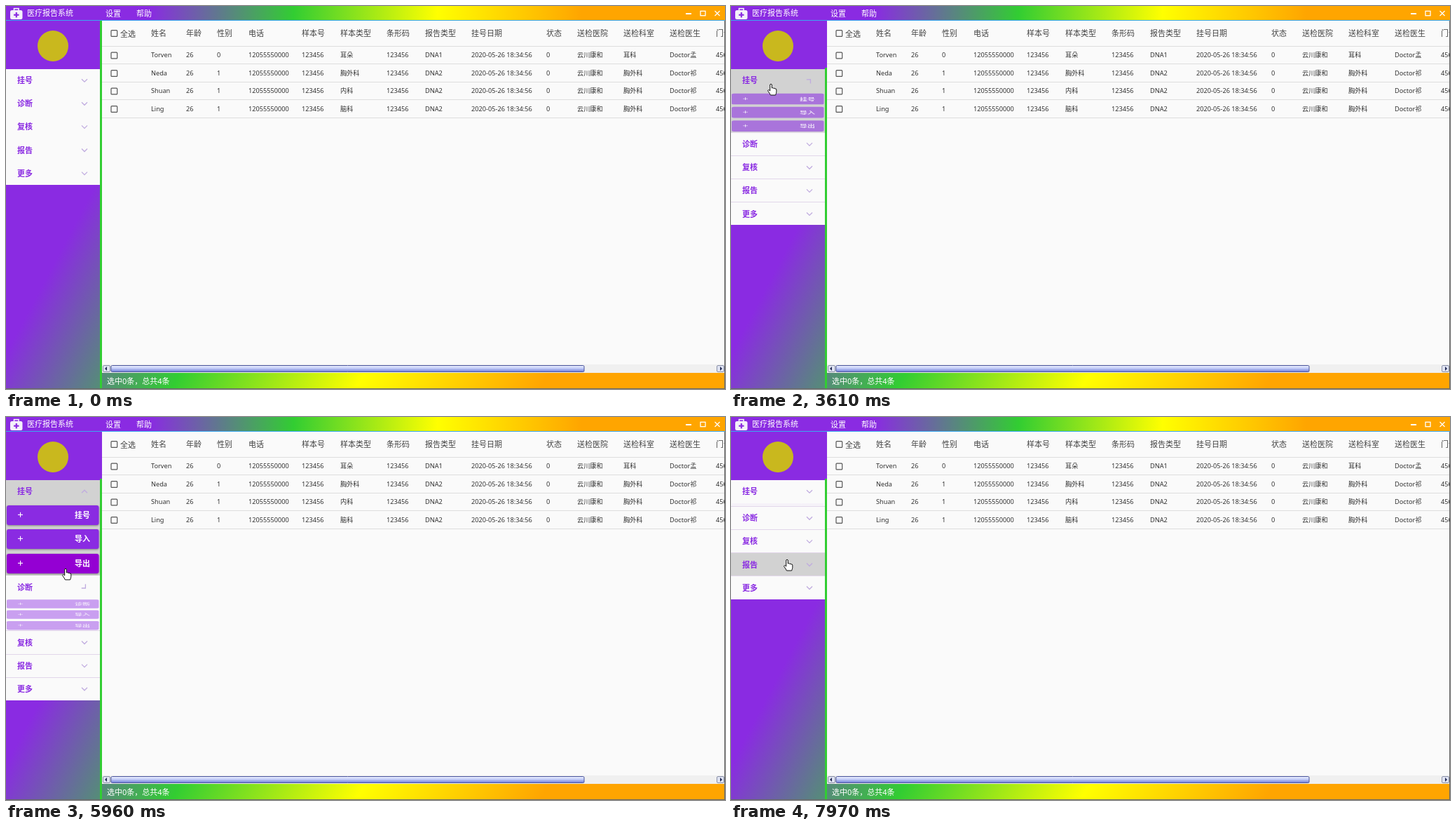
Animation of 1026x546 px, one loop 8 s. Source, as an HTML page with a canvas:

```html
<!DOCTYPE html>
<html lang="zh">
<head>
<meta charset="utf-8">
<style>
html, body { margin: 0; width: 100%; height: 100%; overflow: hidden; }
canvas { display: block; width: 1026px; height: 546px; }
</style>
</head>
<body>
<canvas id="stage"></canvas>
<script>
const W = 1026, H = 546, LOOP = 8000;
const PURPLE = '#8a2be2', GREEN = '#32cd32', PAPER = '#fafafa';
const FONT = '"Noto Sans", "Noto Sans CJK SC", "Noto Sans CJK", sans-serif';
const canvas = document.getElementById('stage');
const dpr = window.devicePixelRatio || 1;
canvas.width = W * dpr;
canvas.height = H * dpr;
const c = canvas.getContext('2d');

const columns = [
  [207, '姓名'], [257, '年龄'], [301, '性别'], [346, '电话'], [422, '样本号'],
  [477, '样本类型'], [543, '条形码'], [598, '报告类型'], [664, '挂号日期'], [771, '状态'],
  [815, '送检医院'], [881, '送检科室'], [947, '送检医生'], [1013, '门诊号']
];
const makeRow = (name, sex, sample, report, dept, doctor) =>
  [name, '26', sex, '12055550000', '123456', sample, '123456', report,
    '2020-05-26 18:34:56', '0', '云川康和', dept, doctor, '456789'];
const rows = [
  makeRow('Torven', '0', '耳朵', 'DNA1', '耳科', 'Doctor孟'),
  makeRow('Neda', '1', '胸外科', 'DNA2', '胸外科', 'Doctor祁'),
  makeRow('Shuan', '1', '内科', 'DNA2', '胸外科', 'Doctor祁'),
  makeRow('Ling', '1', '脑科', 'DNA2', '胸外科', 'Doctor祁')
];
const sections = ['挂号', '诊断', '复核', '报告', '更多'];
const HEAD = 33.1, BODY = 103.3, TOP = 89.6;

// Pointer path: time, x, y
const path = [
  [130, 1018, 536], [920, 140, 36], [1000, 146, 28], [1170, 156, 9], [1770, 156, 9],
  [1840, 190, 10], [1920, 194, 10], [2070, 194, 10], [2840, 72, 40], [2920, 70, 44],
  [3300, 57, 111], [3700, 57, 111], [4240, 66, 137], [4310, 66, 150], [4400, 64, 233],
  [5800, 64, 235], [5950, 85, 216], [6080, 85, 216], [6500, 88, 140], [6660, 89, 145],
  [6800, 89, 145], [7150, 80, 238], [7520, 62, 106], [7730, 62, 106], [7950, 80, 203]
];

const clamp = v => Math.max(0, Math.min(1, v));
const ramp = (t, start, length = 250) => clamp((t - start) / length);

function pointerAt(t) {
  const i = path.findIndex(p => p[0] > t);
  if (i === 0) return null;
  if (i < 0) return path[path.length - 1].slice(1);
  const [t0, x0, y0] = path[i - 1], [t1, x1, y1] = path[i];
  let k = (t - t0) / (t1 - t0);
  k = k * k * (3 - 2 * k);
  return [x0 + (x1 - x0) * k, y0 + (y1 - y0) * k];
}

function box(x, y, w, h, fill) {
  c.fillStyle = fill;
  c.fillRect(x, y, w, h);
}

function text(str, x, y, size, color, weight = 400) {
  c.font = `${weight} ${size}px ${FONT}`;
  c.fillStyle = color;
  c.fillText(str, x, y + size * 0.37);
}

function line(points, color, width) {
  c.beginPath();
  points.forEach(([x, y]) => c.lineTo(x, y));
  c.strokeStyle = color;
  c.lineWidth = width;
  c.stroke();
}

function rounded(x, y, w, h, r, fill) {
  c.beginPath();
  c.roundRect(x, y, w, h, r);
  c.fillStyle = fill;
  c.fill();
}

function shadow(color, blur, dy) {
  c.shadowColor = color;
  c.shadowBlur = blur * dpr;
  c.shadowOffsetY = dy * dpr;
}

// Corner-to-corner gradient over an area starting at the top left
function rainbow(w, h) {
  const g = c.createLinearGradient(0, 0, w, h);
  [[0.2, PURPLE], [0.4, GREEN], [0.6, '#ffff00'], [0.8, '#ffa500']]
    .forEach(([at, color]) => g.addColorStop(at, color));
  box(0, 0, w, h, g);
}

function titleBar(t) {
  rainbow(W, 20);
  if (t >= 1090 && t < 1840) box(130, 0, 45, 20, 'rgba(255,255,255,.2)');
  if (t >= 1840 && t < 2250) box(175, 0, 44, 20, 'rgba(255,255,255,.2)');
  box(0, 20, W, 1, '#3aa8f0');
  rounded(6, 6, 17.5, 13, 2.5, '#f4f0fa');
  c.strokeStyle = '#f4f0fa';
  c.lineWidth = 1.6;
  c.strokeRect(11.5, 3.6, 6.5, 4);
  box(13.7, 9, 2.2, 7.4, PURPLE);
  box(11.1, 11.6, 7.4, 2.2, PURPLE);
  text('医疗报告系统', 30, 10, 11, '#fff');
  text('设置', 142, 10.5, 11, '#fff');
  text('帮助', 186, 10.5, 11, '#fff');
  box(970, 10, 8, 2, '#fff');
  c.strokeStyle = '#fff';
  c.lineWidth = 1.3;
  c.strokeRect(991, 7.3, 7, 6.4);
  line([[1011.5, 7], [1018.5, 14]], '#fff', 1.3);
  line([[1018.5, 7], [1011.5, 14]], '#fff', 1.3);
}

function checkbox(y) {
  c.strokeStyle = '#555';
  c.lineWidth = 1.2;
  c.beginPath();
  c.roundRect(150, y - 4.3, 8.7, 8.7, 1);
  c.stroke();
}

function table() {
  box(137, 21, W - 137, 502, PAPER);
  checkbox(39);
  text('全选', 163, 39.5, 11, '#444');
  columns.forEach(([x, label]) => text(label, x, 39, 11, '#444'));
  box(137, 57, W - 137, 1, '#dedede');
  rows.forEach((row, r) => {
    const y = 70 + r * 25.5;
    checkbox(y + 0.5);
    row.forEach((cell, i) => text(cell, columns[i][0], y, 9.2, '#333'));
    box(137, Math.round(y + 12.3), W - 137, 1, '#dedede');
  });
}

function scrollBar() {
  box(137, 511, W - 137, 12, '#f0f0f0');
  const g = c.createLinearGradient(0, 512, 0, 522);
  g.addColorStop(0, '#f4f6ff');
  g.addColorStop(0.45, '#c3cdf8');
  g.addColorStop(1, '#6472d4');
  [[138, 11], [149.5, 676], [1014, 11]].forEach(([x, w], i) => {
    rounded(x + 0.5, 512.5, w - 1, 9, 1.5, i === 1 ? g : '#dfe3f2');
    c.strokeStyle = i === 1 ? '#4a549c' : '#8a90a8';
    c.lineWidth = 1;
    c.stroke();
  });
  c.fillStyle = '#222a55';
  [[143, -1], [1020, 1]].forEach(([x, dir]) => {
    c.beginPath();
    c.moveTo(x + 2 * dir, 517);
    c.lineTo(x - dir, 514);
    c.lineTo(x - dir, 520);
    c.fill();
  });
}

function chevron(y, turn) {
  c.save();
  c.translate(112, y);
  c.rotate(-Math.PI * turn);
  line([[-4, -2], [0, 2], [4, -2]], '#c0acdf', 1.3);
  c.restore();
}

function subButtons(name, top, p, pointer) {
  c.save();
  c.translate(0, top);
  c.scale(1, p);
  [name, '导入', '导出'].forEach((label, i) => {
    const y = 3 + Math.round(i * 34.4);
    const py = (pointer[1] - top) / p;
    const hover = pointer[0] < 133 && py > y && py < y + 28;
    c.globalAlpha = p;
    if (p === 1) shadow('rgba(0,0,0,.4)', 3, 1);
    rounded(1, y, 131.5, 28, 3, hover ? '#9400d3' : PURPLE);
    shadow('transparent', 0, 0);
    c.globalAlpha = Math.sqrt(p);
    box(17, y + 12.8, 7, 1.1, '#fff');
    box(20, y + 9.8, 1.1, 7, '#fff');
    text(label, 98, y + 14, 11, '#fff', 700);
  });
  c.restore();
}

function sidebar(t, pointer) {
  box(134, 21, 3, H - 21, GREEN);
  // The opened menu leaves its colour on the splitter
  if (t >= 1475) box(134, 21, 3, 67, PURPLE);
  c.beginPath();
  c.arc(67, 57, 22, 0, Math.PI * 2);
  c.fillStyle = '#c9b81e';
  c.fill();

  const closing = [t >= 7733, t >= 5822];
  const open = [
    ramp(t, 3471) - ramp(t, 7733),
    ramp(t, 4423) - ramp(t, 5822), 0, 0, 0
  ];
  const moving = open.findIndex(p => p > 0 && p < 0.7);
  let y = TOP, hand = false;
  sections.forEach((name, i) => {
    const p = open[i], h = HEAD + BODY * p;
    const hover = pointer[0] < 134 && pointer[1] >= y && pointer[1] < y + h;
    const top = Math.floor(y + (i ? 0 : 0.5));
    hand = hand || hover;
    box(0, top, 134, Math.floor(y + h) - top, hover ? '#d2d2d2' : PAPER);
    if (moving >= 0 && i > moving) box(0, top, 134, 1, '#e2d6ea');
    text(name, 16, y + 16.6, 11, PURPLE, 700);
    const turn = closing[i] ? 1 - (1 - p) * 1.35 : p * 1.35;
    chevron(y + 16.6, clamp(turn));
    if (p > 0) subButtons(name, Math.round(y + HEAD), p, pointer);
    y += h;
  });
  return hand;
}

function menu(x, w, items, p) {
  if (p <= 0) return;
  const h = 22 + 22 * items.length;
  c.save();
  c.beginPath();
  c.rect(x - 4, p < 1 ? 17 : 21, w + 8, h + 10);
  c.clip();
  c.translate(0, (p - 1) * h);
  shadow('rgba(0,0,0,.45)', 3, 1);
  box(x, 21, w, h, PURPLE);
  shadow('transparent', 0, 0);
  items.forEach((label, i) => text(label, x + 18, 43 + i * 22, 11, '#fff'));
  c.restore();
}

const arrowShape = new Path2D('M0 0V13.5L3.2 10.6L5.4 15.6L7.6 14.6L5.4 9.8H9.6Z');
const handShape = new Path2D('M-1.3 1Q0-.7 1.3 1V6Q3 5 3.7 6.4Q5.3 5.7 6 7Q7.6 6.6 7.8 8.2V11.5Q7.6 13.5 6.6 16H-.6Q-2 13-4 10.6Q-5 9-3.6 8.7Q-2.3 8.7-1.3 10Z');

function drawPointer([x, y], hand) {
  c.save();
  c.translate(x, y);
  const shape = hand ? handShape : arrowShape;
  c.lineWidth = 1;
  c.strokeStyle = '#111';
  c.fillStyle = '#fff';
  c.fill(shape);
  c.stroke(shape);
  c.restore();
}

function draw(t) {
  c.setTransform(dpr, 0, 0, dpr, 0, 0);
  const pointer = pointerAt(t);
  rainbow(W, H);
  table();
  scrollBar();
  text('选中0条，总共4条', 144, 534.5, 11, '#fff');
  const hand = sidebar(t, pointer || [W, H]);
  titleBar(t);
  box(0, H - 1, W, 1, '#666');
  box(W - 1, 21, 1, H - 21, '#666');
  if (t < 1840) menu(130, 56, ['账号', '主题'], ramp(t, 1225));
  else if (t < 2250) menu(175, 105, ['使用说明', '检查更新', '关于'], ramp(t, 1800, 120));
  if (pointer) drawPointer(pointer, hand);
}

function tick() {
  draw(performance.now() % LOOP);
  requestAnimationFrame(tick);
}
tick();
</script>
</body>
</html>
```
